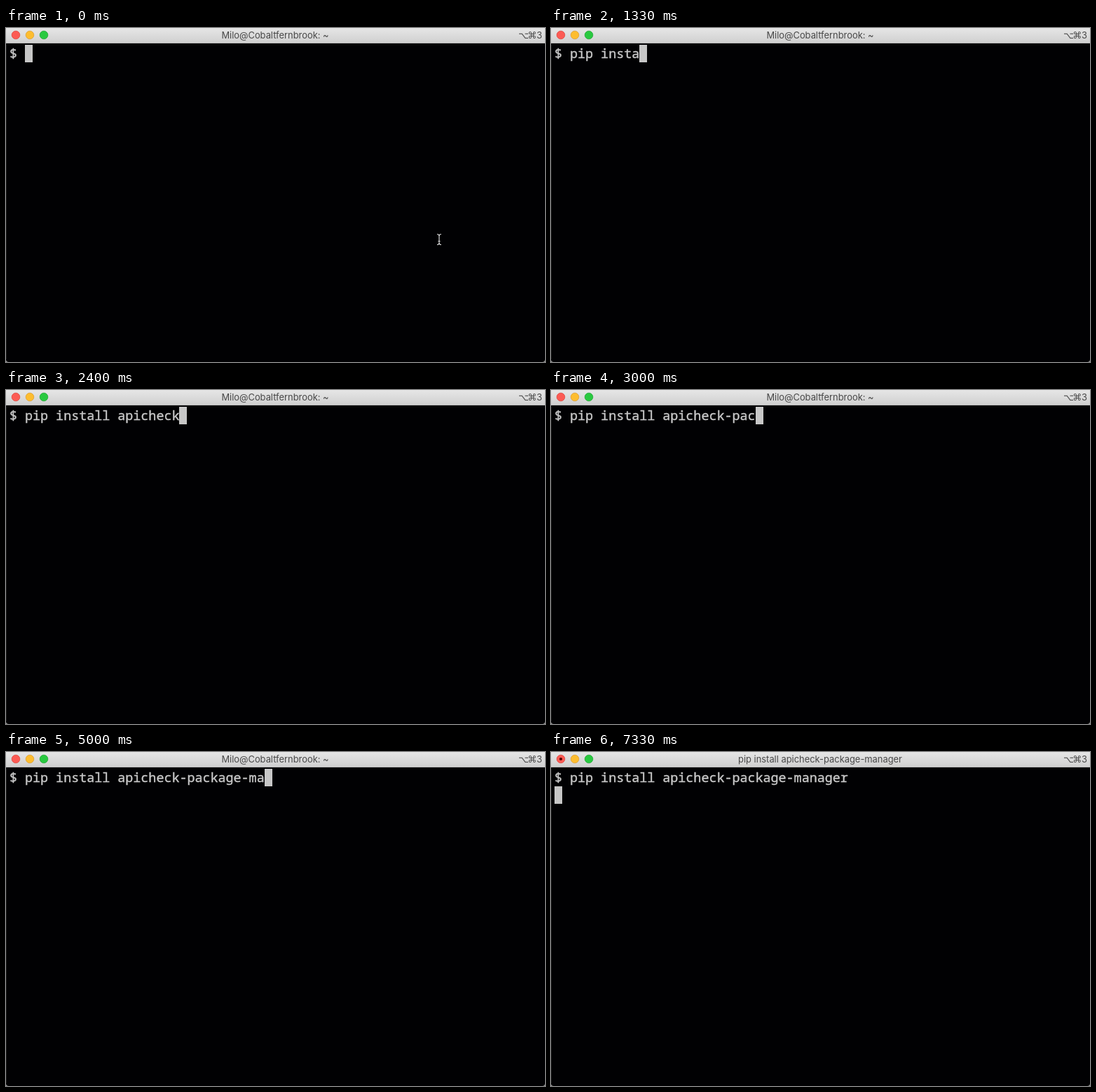
Write an HTML page with a canvas that moves like this. It is 769x477 px and loops after 8 s.

```html
<!DOCTYPE html>
<html lang="en">
<head>
<meta charset="utf-8">
<title>Terminal</title>
<style>
html, body { margin: 0; width: 100%; height: 100%; overflow: hidden; background: #000; }
canvas { display: block; }
</style>
</head>
<body>
<canvas id="stage" width="769" height="477"></canvas>
<script>
const W = 769, H = 477, LOOP = 8000, CELL = 11.02, LEFT = 5;
const ctx = document.getElementById('stage').getContext('2d');
const command = 'pip install apicheck-package-manager';
const idleTitle = 'Milo@Cobaltfernbrook: ~';
const TEXT = '#c7c7c7', INK = '#484848';
const UI = '12.9px Inter, sans-serif', SYMBOL = '13px "DejaVu Sans", sans-serif';
const MONO = '18.37px "Noto Sans Mono", monospace';

// One time per typed character
const keys = [
  530, 600, 730,
  930, 1000, 1070, 1200, 1270, 1330, 1470, 1530, 1600, 1730,
  1800, 1860, 2000, 2070, 2200, 2260, 2400, 2530,
  2730, 2870, 2930, 3060, 3530, 3730, 3860,
  4800, 4870, 5000, 5060, 5200, 5330, 5400, 5530
];
const ENTER = 6530, RETITLE = 6600, BUSY = 7330;

const colX = col => Math.round(LEFT + col * CELL);

function disc(x, y, r, fill, edge) {
  ctx.beginPath();
  ctx.arc(x, y, r, 0, Math.PI * 2);
  ctx.fillStyle = fill;
  ctx.fill();
  if (edge) {
    ctx.strokeStyle = edge;
    ctx.lineWidth = 0.8;
    ctx.stroke();
  }
}

function label(text, x, y, font, color, align = 'center') {
  ctx.font = font;
  ctx.fillStyle = color;
  ctx.textAlign = align;
  ctx.fillText(text, x, y);
}

function titleBar(t) {
  const shade = ctx.createLinearGradient(0, 0, 0, 22);
  shade.addColorStop(0, '#e6e6e6');
  shade.addColorStop(1, '#cfcfcf');
  ctx.fillStyle = shade;
  ctx.fillRect(0, 0, W, 22);
  ctx.fillStyle = '#b8b8b8';
  ctx.fillRect(0, 21, W, 1);
  disc(14, 10, 5.8, '#fc5b54', '#df4841');
  disc(34, 10, 5.8, '#fdbd2f', '#dea035');
  disc(54, 10, 5.8, '#29c940', '#24a936');
  if (t >= BUSY) disc(14, 10, 2.1, '#4d0000');
  label(t < RETITLE ? idleTitle : command, 384, 15, UI, INK);
  label('⌥', 738.5, 15, SYMBOL, INK);
  label('⌘', 750.5, 15, SYMBOL, INK);
  label('3', 765, 15, UI, INK, 'right');
}

function typeRow(text) {
  ctx.strokeStyle = TEXT;
  ctx.lineWidth = 0.45;
  [...text].forEach((ch, i) => {
    const x = LEFT + i * CELL;
    label(ch, x, 43, MONO, TEXT, 'left');
    ctx.strokeText(ch, x, 43);
  });
}

function pointer(x, y) {
  ctx.beginPath();
  for (const s of [-1, 1]) {
    ctx.moveTo(x - 3, y + s * 7.5);
    ctx.quadraticCurveTo(x, y + s * 7.5, x, y + s * 5);
    ctx.quadraticCurveTo(x, y + s * 7.5, x + 3, y + s * 7.5);
  }
  ctx.moveTo(x, y - 5);
  ctx.lineTo(x, y + 5);
  ctx.moveTo(x - 1.5, y + 2.5);
  ctx.lineTo(x + 1.5, y + 2.5);
  ctx.strokeStyle = '#d8d8d8';
  ctx.lineWidth = 1.2;
  ctx.stroke();
}

function draw(t) {
  ctx.fillStyle = '#999';
  ctx.fillRect(0, 0, W, H);
  ctx.fillStyle = '#010103';
  ctx.beginPath();
  ctx.roundRect(0, 20, W, H - 20, [0, 0, 4, 4]);
  ctx.fill();
  ctx.fillStyle = '#1c1c1c';
  ctx.fillRect(0, 22, 1, H - 26);
  titleBar(t);

  const count = keys.filter(k => k <= t).length;
  typeRow('$ ' + command.slice(0, count));

  const entered = t >= ENTER;
  ctx.fillStyle = TEXT;
  ctx.fillRect(colX(entered ? 0 : 2 + count), entered ? 49 : 24, 11, 25);
  if (t < keys[0]) pointer(618, 302);
}

const start = performance.now();
function tick() {
  draw((performance.now() - start) % LOOP);
  requestAnimationFrame(tick);
}
tick();
</script>
</body>
</html>
```
